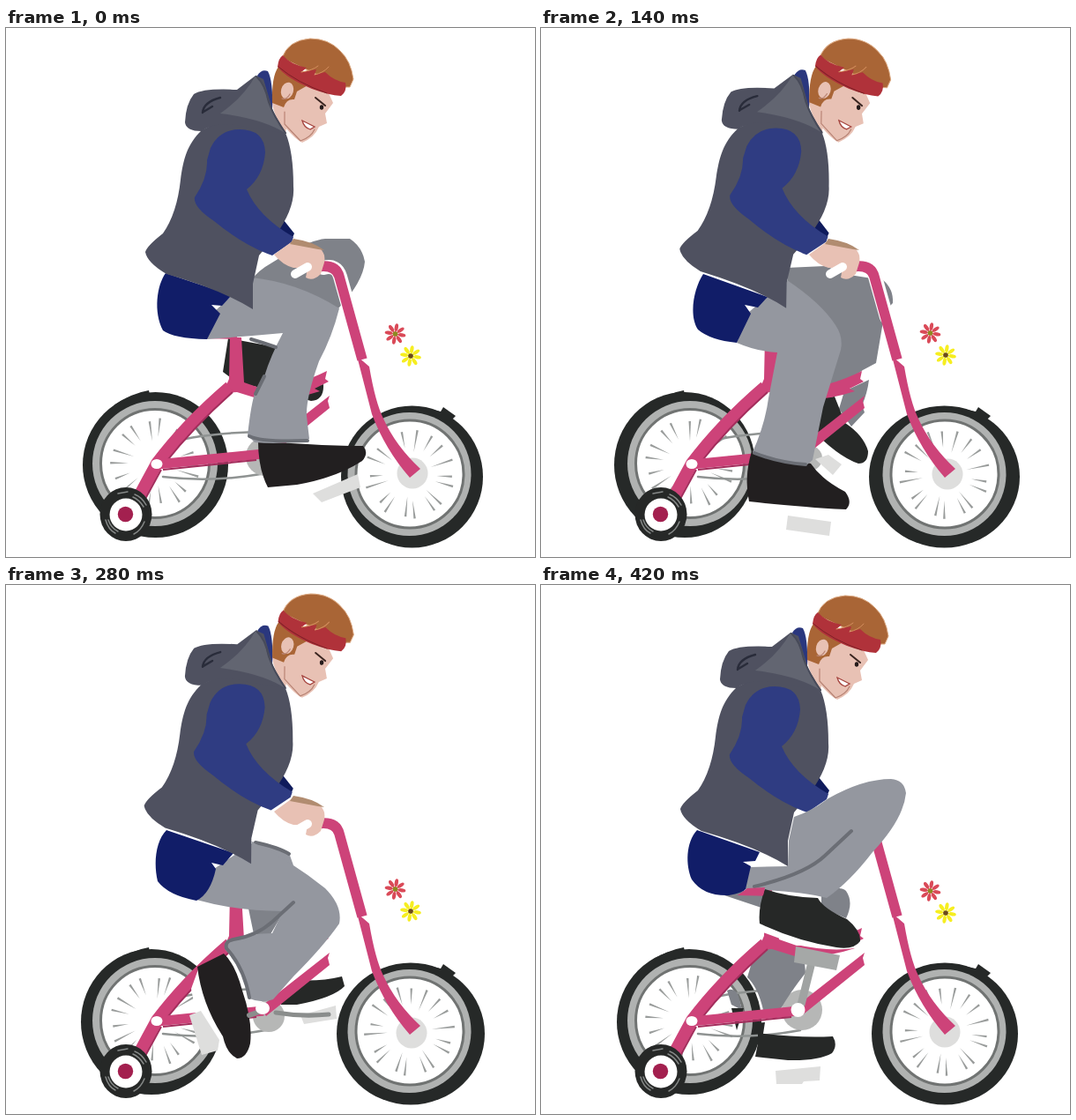
An HTML page for the animation above (0.56 s loop, 600 by 600 pixels).

```html
<!DOCTYPE html>
<html lang="en">
<head>
<meta charset="utf-8">
<title>Small bike ride</title>
<style>
html, body { margin: 0; width: 100%; height: 100%; overflow: hidden; background: #fff; }
svg { display: block; width: 100vw; height: 100vh; }
.tyre { fill: #262928; }
.rim { fill: #b0b2b1; }
.line { fill: none; stroke-linecap: round; stroke-linejoin: round; }
.pink { fill: #cd4379; }
.tube { fill: none; stroke: #cd4379; stroke-linejoin: round; }
.shade { fill: none; stroke: #a32d5c; }
.near { fill: #94979f; }
.far { fill: #7f8289; }
.fold { fill: none; stroke: #6b6e75; stroke-width: 4; stroke-linecap: round; }
.shoe { fill: #221f20; }
.farShoe { fill: #262827; }
.pedal { fill: #dededd; }
.metal { fill: #a5a8a7; }
.shorts { fill: #111d68; }
.vest { fill: #4f5160; }
.skin { fill: #e8c1b4; }
</style>
</head>
<body>
<svg viewBox="0 0 600 600" preserveAspectRatio="xMidYMid meet">
  <g id="rear">
    <ellipse class="tyre" id="rearTyre" cy="495.5" ry="82.5"/>
    <path class="tyre" d="M122,428 Q143,414 162,411 L164,420Z"/>
    <circle class="rim" cx="169" cy="494" r="71"/>
    <circle cx="169" cy="494" r="61.5" fill="#fff" stroke="#707372" stroke-width="3"/>
    <g id="rearSpokes" fill="#999c9b"></g>
  </g>
  <g id="front">
    <ellipse class="tyre" id="frontTyre" cy="509" ry="80.5"/>
    <path class="tyre" d="M470,430 L493,435 L496,430 L510,440 L500,450Z"/>
    <circle class="rim" cx="457.5" cy="506" r="70"/>
    <circle cx="458" cy="506" r="61" fill="#fff" stroke="#707372" stroke-width="3"/>
    <g id="frontSpokes" fill="#999c9b"></g>
    <circle class="pedal" id="hub" r="17.5"/>
  </g>
  <path class="line" stroke="#8f9392" stroke-width="2.5" d="M190,469 Q225,460 285,458 M178,509 Q235,516 294,505"/>
  <circle id="ring" fill="#b6b7b6"/>

  <!-- far leg, one group per pose -->
  <g class="pose">
    <path class="far" d="M278,286 Q286,275 302,266 Q342,241 362,239 L390,239 Q404,248 407,265 Q405,288 377,318 Q330,302 278,286Z"/>
    <path class="farShoe" d="M252,352 L307,362 L318,398 L346,408 L360,404 Q361,422 346,423 Q300,410 262,402 L246,390Z"/>
  </g>
  <g class="pose">
    <path class="far" d="M278,272 L322,270 L350,280 L388,286 Q400,296 399,312 L390,321 L380,380 L365,388 Q346,402 320,414 L318,390 L329,332 L280,290Z"/>
    <path class="far" d="M344,412 L372,399 Q370,415 364,428 L367,436 L352,452 L338,432Z"/>
    <path class="farShoe" d="M310,420 L333,418 L345,448 Q366,462 371,480 Q371,494 360,494 Q336,486 304,452Z"/>
    <path class="pedal" d="M311,489 L326,484 L341,495 L331,507Z"/>
  </g>
  <g class="pose">
    <path class="near" d="M278,291 Q310,296 321,304 L326,318 L290,312Z"/>
    <path class="fold" stroke-width="2" d="M283,292 Q310,298 321,305"/>
    <path class="far" d="M275,367 L316,369 L300,396 L281,396Z"/>
    <path class="farShoe" d="M308,468 L328,448 Q356,450 381,444 L384,455 Q372,468 330,476 L312,476Z"/>
    <path class="pedal" d="M334,488 L374,477 L375,492 L338,498Z"/>
    <path class="line" stroke="#8a8d8c" stroke-width="5" d="M306,485 Q336,490 366,487"/>
  </g>
  <g class="pose">
    <path class="far" d="M318,346 Q340,341 346,347 Q355,360 346,378 L318,366Z"/>
    <path class="far" d="M208,352 L235,346 L252,352 L250,366Z"/>
    <path class="far" d="M240,425 L262,404 L298,416 L300,440 Q284,460 271,482 L252,482 Q246,456 234,445Z"/>
    <path class="far" d="M211,460 Q219,456 224,466 L228,482 L216,476Z"/>
    <path class="farShoe" d="M246,508 Q290,514 331,512 Q337,522 330,531 Q314,540 280,539 L243,535 L246,520Z"/>
    <path class="farShoe" d="M216,480 L230,480 L222,505Z M243,497 L254,496 L252,509 L240,509Z"/>
    <path class="pedal" d="M266,551 L317,546 L316,562 L298,563 L296,566 L267,566Z"/>
  </g>

  <g id="frame">
    <path class="pink" d="M222,352 L262,342 L262,353Z"/>
    <path class="pink" d="M254,351 L267,351 L270,402 L290,409 Q326,408 364,389 L362,398 L366,401 L350,409 L356,412 Q320,424 288,421 L262,413 L246,414 L253,398Z"/>
    <path class="tube" stroke-width="14" d="M254,407 Q204,450 171,494 L151,531"/>
    <path class="shade" stroke-width="2" d="M257,413 Q213,452 180,494 M176,501 L158,534"/>
    <path class="tube" stroke-width="11" d="M171,495 L292,483"/>
    <path class="shade" stroke-width="2" d="M178,501 L284,490"/>
    <path class="pink" d="M288,479 L367,417 L365,423 L367,431 L295,489Z"/>
    <ellipse cx="171" cy="494.5" rx="6.5" ry="5.5" fill="#fff"/>
  </g>
  <g id="trainer">
    <ellipse cx="136" cy="551.5" rx="29.5" ry="30.5" fill="#262827"/>
    <g class="line" stroke="#858887" stroke-width="1.5">
      <path d="M113,558 Q116,569 124,573 M116,558 Q119,567 127,571 M159,541 Q154,532 146,529 M156,543 Q151,535 144,532 M127,528 L138,526 M157,560 Q153,570 145,574"/>
    </g>
    <circle cx="136" cy="552" r="18.5" fill="#fff"/>
    <circle cx="135.5" cy="551.5" r="8.7" fill="#a3204f"/>
  </g>
  <path class="line" stroke="#fff" stroke-width="16" d="M360,272 Q375,268 379,282 L392,328"/>
  <path class="tube" stroke-width="11.5" d="M352,271 Q374,267 378,282 L404,376"/>
  <path class="pink" d="M398,372 L412,384 Q419,425 428,443 Q442,474 470,500 L458,510 Q430,478 415,438Z"/>

  <!-- near leg and shorts -->
  <g class="pose">
    <path class="pedal" d="M348,528 L399,506 L402,521 L358,538Z"/>
    <path class="shoe" d="M286,469 L342,472 Q375,474 405,474 Q412,482 404,491 Q375,510 330,518 L297,521 Q286,500 286,469Z"/>
    <path class="near" d="M228,353 L236,322 L278,283 Q330,288 378,318 Q370,350 355,378 Q340,420 341,440 L344,466 Q320,473 282,470 L274,462 Q278,425 283,412 L293,395 Q300,372 314,346 Q270,350 228,353Z"/>
    <path class="fold" d="M276,463 Q290,470 342,468 M283,415 L293,395"/>
    <path class="fold" stroke-width="2" d="M278,353 Q292,357 306,362"/>
    <path class="shorts" d="M181,278 C171,292 167,322 178,343 Q190,352 228,353 L243,324 L233,314 L245,315 L256,303Z"/>
  </g>
  <g class="pose">
    <path class="shoe" d="M239,480 L306,494 Q318,512 345,526 Q354,538 346,546 Q320,545 300,543 Q262,540 236,537 Q230,510 239,480Z"/>
    <path class="pedal" d="M280,553 L329,560 L327,576 L278,569Z"/>
    <path class="near" d="M222,357 L236,322 L279,286 Q318,312 334,337 Q343,350 340,365 L320,430 L308,490 L301,496 Q270,493 240,481 Q254,450 258,420 L268,368 Q245,367 222,357Z"/>
    <path class="fold" d="M242,482 Q270,493 300,495"/>
    <path class="shorts" d="M184,279 C174,294 167,325 178,342 Q192,354 222,357 L238,324 L231,314 L246,317 L257,305Z"/>
  </g>
  <g class="pose">
    <path d="M218,436 L210,458 L216,488 L248,534 L260,530Z" fill="#fff"/>
    <path class="pedal" d="M208,488 L221,483 L242,516 L240,528 L222,533Z"/>
    <path class="shoe" d="M217,433 L247,418 Q260,430 268,460 Q280,495 277,520 Q273,537 262,537 Q250,531 246,512 Q222,475 217,433Z"/>
    <path class="near" d="M216,357 L236,322 L280,292 Q322,312 362,344 Q382,364 378,384 Q360,410 326,444 L303,470 Q290,475 276,469 Q272,440 249,414 L250,403 Q276,395 302,395 L314,370 Q262,370 216,357Z"/>
    <path class="fold" d="M276,468 Q270,434 250,412 Q248,404 258,402 Q284,398 302,382 L326,360"/>
    <path class="line" stroke="#8a8d8c" stroke-width="6" d="M276,488 L290,483"/>
    <ellipse cx="291" cy="480" rx="8" ry="7" fill="#fff"/>
    <path class="shorts" d="M182,278 C170,290 167,315 172,336 Q184,352 216,358 Q232,350 238,322 L233,315 L246,318 L258,304Z"/>
  </g>
  <g class="pose"></g>

  <g id="rider">
    <path d="M306,225 L315,218 L327,233 L324,240Z" fill="#0f1b5c"/>
    <path class="vest" d="M222,116 C205,132 201,150 198,172 Q194,210 178,233 Q160,247 158,254 Q160,266 182,279 Q245,297 280,319 L280,290 L287,258 L305,236 Q328,205 326,180 Q326,140 317,119 L300,92 L262,96Z"/>
    <path class="skin" d="M301,82 L324,74 L317,120 Q305,104 301,82Z"/>
    <path d="M285,54 Q290,46 297,49 Q303,60 302,92 L298,96 L288,66Z" fill="#2a377e"/>
    <path class="vest" d="M222,117 Q204,117 203,107 Q204,86 213,75 Q224,68 262,70 L283,54 L292,58 L303,95 L318,120 L270,112 Q240,104 222,117Z"/>
    <path d="M243,97 Q270,78 283,54 Q291,58 296,80 Q303,100 318,120 Q292,103 243,97Z" fill="#626571"/>
    <path class="line" stroke="#474a59" stroke-width="2" d="M284,55 Q294,64 298,84 Q304,101 317,119"/>
    <path class="line" stroke="#292c3a" stroke-width="2.4" d="M223,96 Q224,84 243,79 M224,95 L234,89"/>
    <path d="M232,136 Q242,115 265,115 Q293,115 294,141 Q292,168 273,183 Q286,214 326,237 L324,243 L302,258 Q270,247 236,219 Q212,203 214,192 Q229,170 228,150Z" fill="#2f3c82"/>
    <g id="head">
      <path class="skin" d="M322,72 L334,64 L366,74 L371,85 L362,97 L364,108 L355,112 Q350,124 336,130 Q328,126 316,112 L315,90Z"/>
      <path d="M302,85 Q301,55 309,44 L344,64 L330,72 L327,81 Q318,80 315,90Z" fill="#a96536"/>
      <path d="M313,34 Q320,14 345,12 Q366,12 379,26 Q391,37 394,58 L390,67 L383,67Z" fill="#a96536" stroke="#dca982" stroke-width="1"/>
      <path d="M314,31 Q322,41 341,45 L335,50 L352,47 L350,53 L362,50 Q372,60 385,62 Q387,72 380,77 Q366,76 347,69 Q318,57 308,44 Q309,34 314,31Z" fill="#b0323a"/>
      <path class="line" stroke="#7f2026" stroke-width="1" d="M309,44 Q330,62 364,74"/>
      <path class="line" stroke="#d58e5e" stroke-width="1" d="M335,50 Q348,48 354,43 M350,53 Q360,51 366,44"/>
      <ellipse class="skin" cx="319" cy="71" rx="7" ry="9.5" transform="rotate(15 319 71)"/>
      <path class="line" stroke="#b98475" stroke-width="1.2" d="M316,95 L316,109 L334,128 Q346,124 350,115 M313,80 Q318,82 322,75"/>
      <path class="line" stroke="#3a2520" stroke-width="2" d="M351,79 L362,88"/>
      <ellipse cx="358" cy="90" rx="2.2" ry="2.8" fill="#251b1b"/>
      <path d="M336,105 L350,112 L345,115 Q338,113 336,105Z" fill="#fff" stroke="#a5443e" stroke-width="1.3"/>
    </g>
  </g>
  <g id="hand">
    <path class="skin" d="M304,257 L326,241 L355,249 Q363,255 361,266 L357,279 Q348,288 340,283 L342,272 L326,272 Q314,269 304,257Z"/>
    <path d="M326,239 Q348,242 361,252 L354,251 L322,245Z" fill="#b18c70"/>
    <path class="line" id="grip" stroke="#fff" stroke-width="10" d="M328,279 L342,271"/>
  </g>
  <g id="raisedLeg">
    <path class="line" stroke="#a0a3a2" stroke-width="9" d="M306,432 L295,476"/>
    <circle cx="291.5" cy="482" r="8" fill="#fff"/>
    <path class="metal" d="M289,410 L339,420 L335,437 L287,428Z"/>
    <path d="M247,379 Q280,398 360,404 L362,411 Q330,417 290,408 L249,393Z" fill="#fff"/>
    <path class="near" d="M287,263 Q308,256 326,242 Q365,220 397,220 Q412,221 414,236 Q411,266 376,303 Q350,337 324,355 Q295,347 231,345 L237,320 L280,319 L281,290Z"/>
    <path class="fold" d="M242,342 Q300,328 322,307 L352,279"/>
    <path class="farShoe" d="M254,345 Q280,354 314,355 Q320,367 347,379 Q363,392 362,404 Q355,414 335,411 Q290,404 248,384 Q246,366 254,345Z"/>
    <path class="pink" d="M223,352 L234,344 L254,343 L252,352Z"/>
    <path class="shorts" d="M177,278 C164,292 164,318 171,334 Q184,353 213,352 Q229,349 232,345 L238,319 L229,314 L243,313 L248,303Z"/>
  </g>
  <g id="flowers"></g>
</svg>
<script>
const byId = id => document.getElementById(id);
const set = (id, attrs) => {
  for (const k in attrs) byId(id).setAttribute(k, attrs[k]);
};
const STEP = 140;

const poses = [
  { rear: [169.5, 82.5], front: [460.5, 80.5], hub: [461, 505], ring: [294, 486, 22], lean: 0, shift: [0, 0], spin: 0, bloom: 0 },
  { rear: [163, 80], front: [457.5, 85.5], hub: [461, 506], ring: [305, 488, 14], lean: 1, shift: [-1, -3], spin: 7, bloom: -1 },
  { rear: [165, 80], front: [459, 84], hub: [460, 508], ring: [298, 489, 18], lean: 0.5, shift: [-1.5, -3.5], spin: 13, bloom: -2 },
  { rear: [168, 82], front: [458, 83], hub: [458, 507], ring: [296, 482, 23], lean: 0, shift: [0, 0], spin: 4, bloom: 0 }
];

function spokes(count, seed) {
  let out = "";
  for (let i = 0; i < count; i++) {
    const inner = 25 + 6 * Math.abs(Math.sin(i * 2.1 + seed));
    const outer = 45 + 7 * Math.abs(Math.cos(i * 1.7 + seed));
    const angle = i * 360 / count + 4 * Math.sin(i * 3 + seed);
    out += `<path transform="rotate(${angle})" d="M${inner},0 L${outer},-1.5 L${outer},1Z"/>`;
  }
  return out;
}

function flower(x, y, petal, core) {
  let out = `<g transform="translate(${x} ${y})">`;
  for (let a = 10; a < 360; a += 45) {
    out += `<ellipse cx="7.6" rx="4.4" ry="2.1" fill="${petal}" transform="rotate(${a})"/>`
      + `<path d="M2,0H7" stroke="${petal}" stroke-width="1.4" transform="rotate(${a})"/>`;
  }
  return out + `<circle r="2.8" fill="${core}"/></g>`;
}

byId("rearSpokes").innerHTML = spokes(18, 1);
byId("frontSpokes").innerHTML = spokes(18, 2);
byId("flowers").innerHTML = flower(441.5, 347, "#da4a58", "#8d8a20") + flower(459, 372, "#f6ee20", "#6b4a1c");

const groups = [...document.querySelectorAll(".pose")];
const show = (el, on) => { el.style.display = on ? "" : "none"; };

function draw(time) {
  const n = Math.floor(time / STEP) % poses.length;
  const p = poses[n];
  groups.forEach((g, i) => show(g, i % poses.length === n));
  show(byId("raisedLeg"), n === 3);
  show(byId("hand"), n !== 3);
  set("rearTyre", { cx: p.rear[0], rx: p.rear[1] });
  set("frontTyre", { cx: p.front[0], rx: p.front[1] });
  set("rearSpokes", { transform: `translate(169 494) rotate(${p.spin})` });
  set("frontSpokes", { transform: `translate(458 506) rotate(${p.spin})` });
  set("hub", { cx: p.hub[0], cy: p.hub[1] });
  set("ring", { cx: p.ring[0], cy: p.ring[1], r: p.ring[2] });
  set("rider", { transform: `translate(${p.shift}) rotate(${p.lean} 180 270)` });
  set("flowers", { transform: `translate(0 ${p.bloom})` });
}

const start = performance.now();
function tick() {
  draw(performance.now() - start);
  requestAnimationFrame(tick);
}
tick();
</script>
</body>
</html>
```
